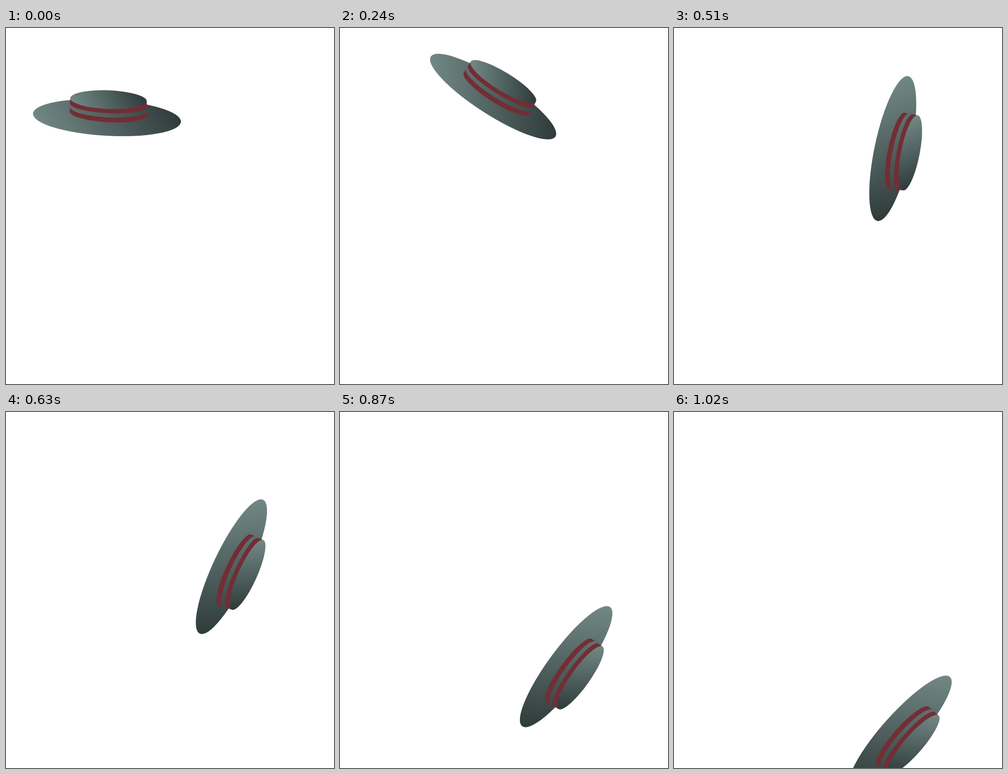
Recreate the animation shown at these times as an HTML page with a canvas. Size 718x780 px, loop 1.05 s.

```html
<!DOCTYPE html>
<html lang="en">
<head>
<meta charset="utf-8">
<title>Hat</title>
<style>
html, body { margin: 0; width: 100%; height: 100%; overflow: hidden; background: #fff; }
canvas { display: block; }
</style>
</head>
<body>
<canvas id="stage" width="718" height="780"></canvas>
<script>
const ctx = document.getElementById('stage').getContext('2d');
const STEP = 30, COUNT = 35, RAD = Math.PI / 180;
const LIGHT = '#728885', DARK = '#2f3b3a', BAND = '#732d35';
const LIGHT_DIR = -32 * RAD;
const LIFT = 10; // the hat turns about a point this far above its brim centre

// The throw: place, tilt of the hat and direction of travel at each turn
const keys = [
  { step: 0, x: 221.6, y: 186.5, tilt: 3.2, heading: -30 },
  { step: 9, x: 356.3, y: 141.5, tilt: 36.4, heading: 2 },
  { step: 13, x: 452, y: 199.3, tilt: 88.8, heading: 49 },
  { step: 22, x: 503, y: 362.4, tilt: 118.6, heading: 90 },
  { step: 34, x: 503.1, y: 707.8, tilt: 131.9, heading: 90 }
];

const mix = (a, b, f) => a + (b - a) * f;

// Cubic from a to b, with handles da and db
function curve(a, da, b, db, f) {
  const p = mix(a, a + da, f), q = mix(a + da, b - db, f), r = mix(b - db, b, f);
  return mix(mix(p, q, f), mix(q, r, f), f);
}

function pose(step) {
  const i = keys.findIndex((k, n) => n && step <= k.step);
  const a = keys[i - 1], b = keys[i];
  const f = (step - a.step) / (b.step - a.step);
  const h = Math.hypot(b.x - a.x, b.y - a.y) / 3;
  const ha = a.heading * RAD, hb = b.heading * RAD;
  return {
    x: curve(a.x, h * Math.cos(ha), b.x, h * Math.cos(hb), f),
    y: curve(a.y, h * Math.sin(ha), b.y, h * Math.sin(hb), f),
    angle: mix(a.tilt, b.tilt, f) * RAD
  };
}

// Cross-section of the crown at height y: it narrows and leans slightly upwards
const ring = (y, ry) => ({ x: 3.5 + y * 0.06, y, rx: 85.7 + y * 0.05, ry, tilt: y * 0.025 * RAD });

function arc(e, from, to, back) {
  ctx.ellipse(e.x, e.y, e.rx, e.ry, e.tilt, from, to, back);
}

function disc(e) {
  const c = Math.cos(LIGHT_DIR), s = Math.sin(LIGHT_DIR);
  const reach = Math.hypot(e.rx * c, e.ry * s);
  const g = ctx.createLinearGradient(
    e.x - c * reach, e.y - s * reach, e.x + c * reach, e.y + s * reach);
  g.addColorStop(0, LIGHT);
  g.addColorStop(1, DARK);
  ctx.beginPath();
  arc(e, 0, 2 * Math.PI);
  ctx.fillStyle = g;
  ctx.fill();
}

function band(y, height, ry) {
  ctx.beginPath();
  arc(ring(y, ry), 0, Math.PI);
  arc(ring(y + height, ry), Math.PI, 0, true);
  ctx.closePath();
  ctx.fillStyle = BAND;
  ctx.fill();
}

function draw({ x, y, angle }) {
  ctx.fillStyle = '#fff';
  ctx.fillRect(0, 0, 718, 780);
  ctx.save();
  ctx.translate(x, y);
  ctx.rotate(angle);
  ctx.translate(0, LIFT);
  disc({ x: 0, y: 0, rx: 162.2, ry: 39.6, tilt: 0 });
  band(-20.2, 10.5, 19.6);
  band(-39.6, 12, 17.6);
  disc(ring(-39.6, 20.4));
  ctx.restore();
}

const start = performance.now();
function tick() {
  const t = Math.max(0, performance.now() - start);
  draw(pose(Math.floor(t / STEP) % COUNT));
  requestAnimationFrame(tick);
}
tick();
</script>
</body>
</html>
```
